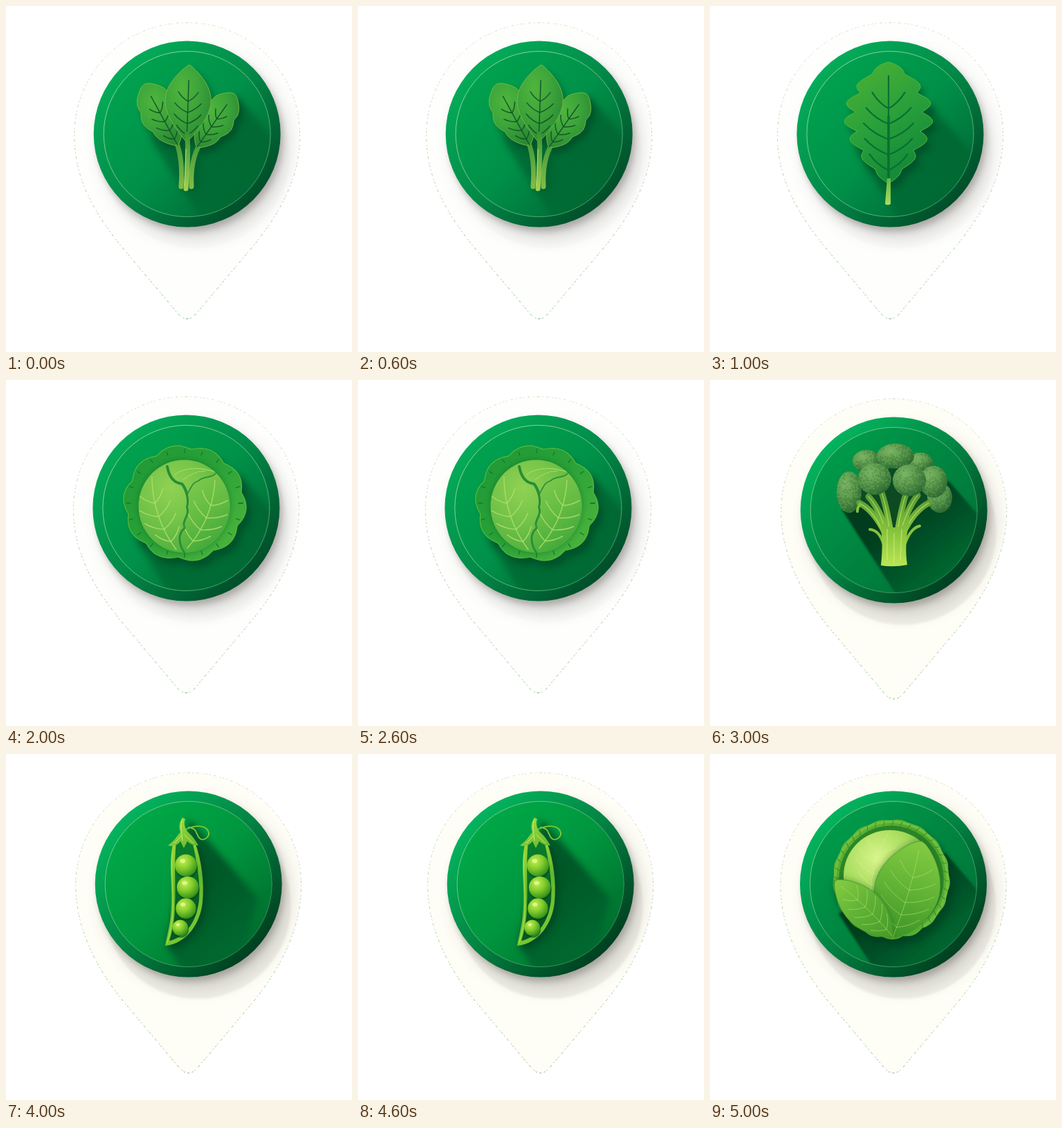
Animation, 500 px wide and 500 px high, one loop 6000 ms. Source, as an HTML page:

```html
<!DOCTYPE html>
<html lang="en">
<head>
<meta charset="utf-8">
<title>Vegetable map pins</title>
<style>
html, body { margin: 0; width: 100%; height: 100%; overflow: hidden; background: #fff; }
svg { display: block; width: 100%; height: 100%; }
.scene { opacity: 0; }
</style>
</head>
<body>
<svg id="stage" viewBox="0 0 500 500" fill="none" stroke-linecap="round" stroke-linejoin="round"></svg>
<script>
const { sin, cos, abs, sqrt, hypot, PI } = Math;
let defs = '', ids = 0;

const define = (tag, attributes, content) => {
  const id = 'd' + ids++;
  defs += `<${tag} id="${id}" ${attributes}>${content}</${tag}>`;
  return `url(#${id})`;
};
const stops = colors => colors.map((c, i) => `<stop offset="${i / (colors.length - 1)}" stop-color="${c}"/>`).join('');
const linear = (x1, y1, x2, y2, ...colors) => define('linearGradient',
  `gradientUnits="userSpaceOnUse" x1="${x1}" y1="${y1}" x2="${x2}" y2="${y2}"`, stops(colors));
const lit = (...colors) => define('radialGradient', 'cx=".36" cy=".3" r=".75"', stops(colors));
const blur = size => define('filter', 'x="-50%" y="-50%" width="200%" height="200%"', `<feGaussianBlur stdDeviation="${size}"/>`);
const clip = content => define('clipPath', '', content);
const [soft, mid, wide] = [1.5, 5, 12].map(blur);

const shape = (d, fill, more = '') => `<path d="${d}" fill="${fill}" ${more}/>`;
const line = (d, color, width, more = '') => `<path d="${d}" stroke="${color}" stroke-width="${width}" ${more}/>`;
const oval = (x, y, rx, ry, fill, more = '') => `<ellipse cx="${x}" cy="${y}" rx="${rx}" ry="${ry}" fill="${fill}" ${more}/>`;
const shadow = (d, x, y, opacity = .45) =>
  shape(d, '#00391c', `transform="translate(${x} ${y})" opacity="${opacity}" filter="${mid}"`);
const steps = (n, make) => Array.from({ length: n + 1 }, (_, i) => make(i / n));
const join = points => 'M' + points.map(p => p.map(v => v.toFixed(1))).join('L');

// Points measured along an axis and sideways from it
function axis([ax, ay], [bx, by]) {
  const dx = bx - ax, dy = by - ay, length = hypot(dx, dy);
  return (t, off) => [ax + dx * t - dy / length * off, ay + dy * t + dx / length * off];
}

// Leaf outline: a swelling profile with optional rounded lobes
function leaf(base, tip, width, { lobes = 0, depth = 0, phase = 0, skew = 1.1, blunt = .7 } = {}) {
  const at = axis(base, tip);
  const half = t => sin(PI * t ** skew) ** blunt * (width + depth * abs(sin(PI * (lobes * t + phase))));
  const edge = side => steps(70, t => at(t, side * (t % 1 ? half(t) : 0)));
  return join([...edge(-1), ...edge(1).reverse()]) + 'Z';
}

// Midrib with paired ribs sweeping towards the tip
function veins(base, tip, ribs, reach, bend = 0) {
  const at = axis(base, tip), middle = t => bend * 4 * t * (1 - t);
  let d = join(steps(12, t => at(t, middle(t))));
  for (let i = 0; i < ribs; i++) {
    const t = .12 + .72 * i / ribs, out = reach * sin(PI * (t + .12)) ** .7;
    for (const side of [-1, 1]) {
      d += `M${at(t, middle(t))}Q${at(t + .05, middle(t) + side * out * .6)} ${at(t + .15, middle(t) + side * out)}`;
    }
  }
  return d;
}

// Ellipse with a scalloped edge
const scallop = (x, y, rx, ry, lobes, depth) => join(steps(180, t => {
  const a = 2 * PI * t, r = depth * abs(sin(lobes * a / 2 + 1));
  return [x + (rx + r) * cos(a), y + (ry + r) * sin(a)];
})) + 'Z';

// Marker with a bevelled disc; the art casts a long shadow from edge point a to b
function pin({ x, top, bottom, paper, rim, face, ring, flat, shade }, [[ax, ay], [bx, by]], art) {
  const y = top + 161, rx = 135, ry = 134.6, w = 163, k = 90;
  const half = s => `C${x + s * k} ${top} ${x + s * w} ${y - k} ${x + s * w} ${y + 2}
    C${x + s * w} ${y + 75} ${x + s * 122} ${bottom - 139} ${x + s * 97} ${bottom - 107}
    L${x + s * 12} ${bottom - 6}Q${x + s * 6} ${bottom} ${x} ${bottom}`;
  const body = [1, -1].map(s => `M${x} ${top}${half(s)}`).join('');
  const across = (size, colors) => linear(x - size, y - size, x + size, y + size, ...colors);
  const inset = [x, y, rx - 14.5, ry - 15];
  const cast = `M${ax} ${ay}L${bx} ${by}l100 115L${ax + 80} ${ay + 125}Z`;
  return shape(body, paper)
    + `<g clip-path="${clip(shape(body, '#000'))}">`
    + oval(x + 13, y + 31, rx, ry, '#77745f', `opacity="${flat}" filter="${soft}"`)
    + oval(x + 11, y + 16, rx, ry, '#66645d', `opacity=".24" filter="${wide}"`)
    + oval(x + 4, y + 7, rx - 1, ry - 1, '#66645d', `opacity=".4" filter="${mid}"`) + '</g>'
    + line(body, linear(0, top, 0, bottom, '#b5d3a4', '#3c9a46'), .8, 'stroke-dasharray="2 4 1 5 3 6 1 3" opacity=".75"')
    + oval(x, y, rx, ry, across(96, rim))
    + oval(...inset, across(85, face))
    + `<g clip-path="${clip(oval(...inset, '#000'))}">`
    + shape(cast, linear(x, y, x + 75, y + 90, '#00371a', '#004d26', '#006630'), `opacity="${shade}" filter="${shade < .8 ? mid : soft}"`) + '</g>'
    + oval(...inset, 'none', `stroke="${across(90, ring)}" stroke-width="1"`)
    + art;
}

function spinach() {
  const outline = 'stroke="#82bd45" stroke-width=".9"', ragged = { lobes: 3, depth: 4, skew: 1.15, blunt: .55 };
  const blades = [
    [[248, 201], [200, 113], 25, ragged],
    [[276, 204], [330, 127], 22, ragged],
    [[261, 197], [265, 85], 33, { skew: 1.12, blunt: .85 }]
  ];
  const stalks = 'M246 196Q256 222 253 261M281 198C269 217 267 240 268 261', main = 'M262 185Q264 220 260 264';
  return blades.map(b => shadow(leaf(...b), 6, 8)).join('')
    + line(stalks, '#00471f', 9, `opacity=".35" transform="translate(5 3)" filter="${mid}"`)
    + line(stalks, linear(0, 190, 0, 265, '#3b9638', '#83bd48'), 7)
    + blades.map(([base, tip, width, style]) => shape(leaf(base, tip, width, style), lit('#4fb53e', '#3da53a', '#2a8a34'), outline)
      + line(veins(base, axis(base, tip)(.8, 0), 4, width * .6), '#175726', 1.5)).join('')
    + line(main, linear(0, 185, 0, 268, '#3b9636', '#a3d152'), 7)
    + line('M260 207L258 260', '#b8df68', 1);
}

function oak() {
  const base = [258, 256], tip = [258, 81];
  const blade = leaf(base, tip, 48, { lobes: 6.3, phase: .3, depth: 16, skew: 1.15 });
  return shadow(blade, 6, 9)
    + line('M259 250V286', '#00391c', 8, `transform="translate(5 3)" opacity=".4" filter="${mid}"`)
    + shape(blade, linear(220, 105, 295, 220, '#43ac36', '#29a03b', '#168c38'), 'stroke="#55b83e" stroke-width="1"')
    + line(veins(base, [258, 101], 5, 36), '#087032', 2.2)
    + line('M258 160V252', '#087032', 3.5)
    + shape('M256 249H261V286Q257 289 253 286Z', linear(0, 249, 0, 288, '#62b83d', '#b2dc60'));
}

function cabbage() {
  const back = scallop(258.5, 178, 83, 78, 10, 6), ball = [257.5, 182.5, 66, 67];
  const seam = 'C258 154 266 170 262 184C267 196 253 204 259 214C248 222 250 238 259 250';
  const fold = 'M306 132C298 144 286 137 278 146C270 147 266 158 262 165' + seam;
  return shadow(back, 7, 10)
    + shape(back, linear(195, 110, 325, 235, '#219a37', '#2aa238', '#48b23b'), 'stroke="#56b93f" stroke-width="1.2"')
    + steps(20, t => line(join([.93, 1].map(r => [258 + 84 * r * cos(t * 2 * PI), 178 + 78 * r * sin(t * 2 * PI)])), '#137a2d', 1.3)).join('')
    + oval(...ball, '#00551f', `opacity=".45" filter="${mid}"`)
    + oval(...ball, lit('#90d253', '#73c348', '#4dae3d'))
    + `<g clip-path="${clip(oval(...ball, '#000'))}">`
    + line('M243 137Q265 121 304 133M256 144Q275 130 288 132', '#a5d967', 1.2)
    + line(veins([246, 245], [211, 140], 4, 24, -9), '#a9dc69', 1.4)
    + line('M233 125Q237 148 254 150' + seam, '#298e35', 4)
    + shape(fold + 'H340V132Z', linear(265, 150, 315, 225, '#7bc84b', '#64bc43', '#45aa3c'))
    + line(veins([262, 243], [302, 145], 4, 27, 9), '#a6da65', 1.4)
    + line(fold, '#298e35', 1.7) + '</g>';
}

function broccoli() {
  let seed = 7;
  const random = () => (seed = seed * 16807 % 2147483647) / 2147483647;
  const base = lit('#7ab462', '#57954a', '#2c6831');
  const floret = ([x, y, rx, ry]) => oval(x, y, rx, ry, base)
    + steps(Math.round(rx * ry / 3), t => {
      const r = .97 * sqrt(t), a = 2.4 * t * Math.round(rx * ry / 3);
      const light = random() - .25 * r * (cos(a) + sin(a)) > .5;
      return oval((x + rx * r * cos(a)).toFixed(1), (y + ry * r * sin(a)).toFixed(1), 1.1, 1,
        light ? '#8cc375' : '#28602e', 'opacity=".3"');
    }).join('');
  const back = [[226, 117, 20, 16], [304, 119, 18, 14], [201, 162, 18, 30], [332, 170, 18, 22], [323, 147, 20, 23], [268, 110, 27, 18]];
  const front = [[238, 143, 24, 23], [288, 145, 24, 23]];
  const skin = linear(0, 160, 0, 268, '#4f9433', '#82c03b', '#b9e554');
  // Branches fan out of the trunk, drooping more the further they reach
  const branches = [-50, -37, -19, 19, 34, 50].map(reach => {
    const end = [266 + reach, 157 + reach * reach / 120], root = 266 + reach * .25;
    return line(`M${end}Q${266 + reach * .58} ${176 + abs(reach) * .25} ${root} 222`, skin, 9)
      + line(`M${end}Q${266 + reach * .55} ${177 + abs(reach) * .25} ${root - 1} 226`, '#d2ee70', 1.3, 'opacity=".6"');
  }).join('');
  return shape('M200 150L266 125L335 150L310 182L285 212H247L222 182Z', '#0b4a24')
    + back.map(floret).join('')
    + shape('M225 158H306L286 212H246Z', '#0d4a21')
    + branches
    + line('M251 238Q245 217 231 216M282 236Q290 214 303 211M218 180Q213 182 213 190', '#86c13d', 4)
    + shape('M247 268C250 240 249 222 245 204Q266 222 288 204C283 226 282 248 285 267Q266 271 247 268Z', skin)
    + line('M256 216V260M266 222V264M277 216L275 260', '#dcf27c', 1.3, 'opacity=".6"')
    + front.map(floret).join('');
}

function peas() {
  const pod = 'M241 130C235 158 240 182 239 212C239 242 233 261 230 277C262 274 281 244 284 214C287 184 282 153 274 130Z';
  const hollow = 'M246 126C242 162 246 190 244 218C244 242 239 260 236 270C262 264 276 239 279 211C281 184 276 155 269 126Z';
  const pea = lit('#c8ee55', '#80cb2c', '#2f8c1b');
  const row = [0, 1, 2, 3].map(i => {
    const x = 260 + 5.5 * i - 2.75 * i * i, y = 161 + 32 * i - .22 * i ** 3, r = 16 - .17 * i ** 3;
    return oval(x + 1, y + 3, r, r, '#034b1a', 'opacity=".6"') + oval(x, y, r, r, pea)
      + oval(x - r * .3, y - r * .4, r * .24, r * .18, '#eaffa5', 'opacity=".65"');
  }).join('');
  return shadow(pod, 6, 5, .5)
    + shape(pod, linear(235, 150, 288, 225, '#91d43b', '#61b72b', '#73c632'))
    + shape(hollow, linear(242, 150, 282, 225, '#087c2a', '#055820'))
    + line('M240 145C238 176 243 200 241 228C240 250 236 262 233 273', '#a8df4b', 1.3)
    + row
    + line('M260 109C273 102 288 103 292 111C296 119 286 127 280 122C274 117 278 108 264 106', '#80c83a', 1.8)
    + shape('M252 113C249 104 251 98 255 92L259 94C256 101 259 108 263 113C270 119 274 125 278 132C270 132 266 130 262 126L257 136L252 126C247 133 240 134 234 132C243 126 246 120 252 113Z',
      linear(240, 95, 270, 135, '#a3df49', '#68b72e'))
    + line('M254 96Q252 106 255 125M254 118L243 129M258 117L271 129', '#c6ee67', 1);
}

function savoy() {
  const back = scallop(262, 181, 82, 84, 17, 3), ball = [260, 176, 67, 66];
  const rimAt = (t, r) => [262 + 84 * r * cos(PI * (1 + t)), 181 + 86 * r * sin(PI * (1 + t))];
  const curl = r => join(steps(30, t => rimAt(t * 1.3, r)));
  const folds = [
    { base: [264, 265], tip: [306, 126], width: 47, tones: ['#84cb42', '#61b335', '#3c9426'] },
    { base: [263, 263], tip: [181, 183], width: 27, tones: ['#85cc43', '#5fb135', '#469b2a'] }
  ];
  return shadow(back, 7, 10, .5)
    + shape(back, linear(192, 115, 330, 245, '#5bb334', '#4aa62d', '#5cb535'))
    + line(curl(.86), '#2b8527', 7)
    + line(curl(.97), '#72be3e', 4)
    + steps(26, t => line(join([rimAt(t * 1.3, .9), rimAt(t * 1.3 + .012, .98)]), '#3d9429', 1.2)).join('')
    + oval(...ball, lit('#d9f48a', '#a6dc5c', '#57b034'))
    + line(veins([232, 200], [258, 114], 4, 30, -6), '#dbf49a', 1, 'opacity=".6"')
    + folds.map(({ base, tip, width, tones }) => {
      const blade = leaf(base, tip, width, { skew: 1, blunt: .7 });
      return shadow(blade, -1, -1, .35)
        + shape(blade, linear(...tip, ...base, ...tones), 'stroke="#3f972b" stroke-width=".8"')
        + line(veins(base, axis(base, tip)(.9, 0), 5, width * .8, 3), '#b9e777', .9, 'opacity=".6"');
    }).join('');
}

const early = { top: 24, bottom: 452, paper: '#fefefd', flat: .02, shade: .4,
  rim: ['#04ac59', '#028a48', '#004d29'], face: ['#00a14f', '#009148', '#006c38'], ring: ['#8bd9a0', '#6ac48a', '#3f9c5f'] };
const late = { top: 27, bottom: 461, paper: '#fefdf6', flat: .1, shade: .95,
  rim: ['#04b45e', '#028342', '#003f20'], face: ['#009a4a', '#008540', '#007337'], ring: ['#77cf91', '#55b576', '#2d8550'] };

const scenes = [
  pin({ ...early, x: 261.7 }, [[207, 190], [335, 132]], spinach()),
  pin({ ...early, x: 260.4 }, [[212, 212], [320, 145]], oak()),
  pin({ ...early, x: 260.4 }, [[190, 235], [340, 140]], cabbage()),
  pin({ ...late, x: 265.7 }, [[191, 188], [345, 146]], broccoli()),
  pin({ ...late, x: 263.7, shade: .65, face: ['#00a846', '#00963e', '#00702f'] }, [[232, 276], [265, 94]], peas()),
  pin({ ...late, x: 265 }, [[186, 231], [340, 143]], savoy())
];

const stage = document.getElementById('stage');
stage.innerHTML = `<defs>${defs}</defs>` + scenes.map(s => `<g class="scene">${s}</g>`).join('');

const hold = 1000, loop = hold * scenes.length, share = 1 / scenes.length;
stage.querySelectorAll('.scene').forEach((scene, i) => scene.animate([
  { opacity: 1, offset: 0 }, { opacity: 1, offset: share },
  { opacity: 0, offset: share }, { opacity: 0, offset: 1 }
], { duration: loop, iterations: Infinity, delay: i ? i * hold - loop : 0 }));
</script>
</body>
</html>
```
